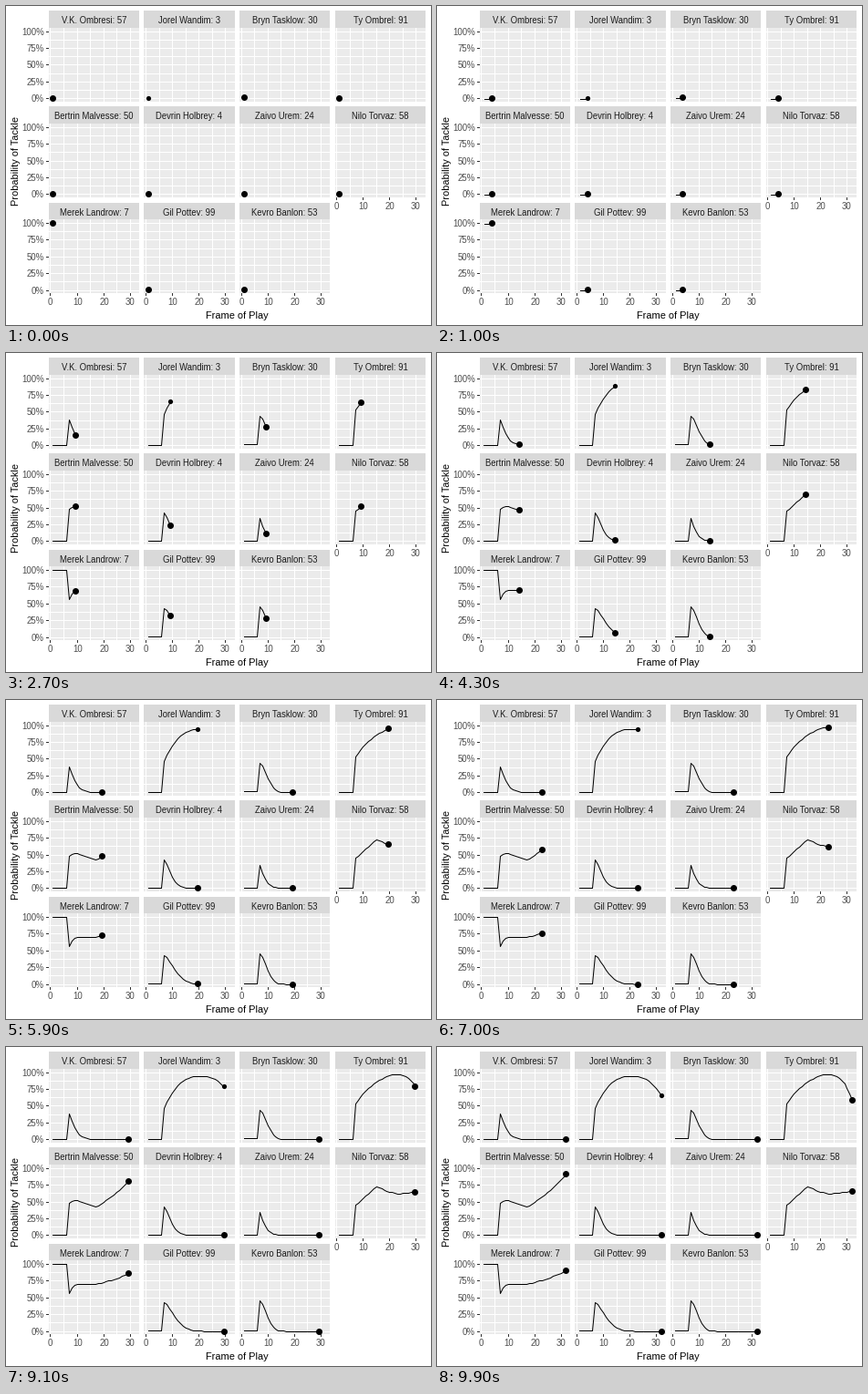
Recreate the animation shown at these times as a matplotlib script. Size 466 by 350 pixels, loop 10000 ms.

```python
import numpy as np
import matplotlib.pyplot as plt
from matplotlib.animation import FuncAnimation
from matplotlib.patches import Circle, Rectangle

W, H, DPI = 466, 350, 64
PT = 72 / DPI                      # points per pixel
FRAMES, INTERVAL = 100, 100

# Panel layout in pixels, y pointing down; scales are padded by 5 %
LEFT, PANEL_W, PITCH_X = 46.85, 99.12, 104.6
STRIP_TOP, PANEL_TOP, PANEL_H, PITCH_Y = 5.2, 23.92, 80.96, 105.2
UNIT_X, UNIT_Y = PANEL_W / 34.1, PANEL_H / 1.1

PLAY = np.arange(1, 33)
KEYS = np.round((PLAY - 1) / 31 * (FRAMES - 1))
JUMP = 7                           # play frame where every curve leaves its start


def decay(peak, tau, power, start=0.0):
    """Jump to a peak, then fade to zero."""
    age = np.maximum(PLAY - JUMP, 0) / tau
    return np.where(PLAY < JUMP, start, peak * np.exp(-age ** power))


def ease(u, power):
    """Ease in for a positive power, out for a negative one."""
    return u ** power if power > 0 else 1 - (1 - u) ** -power


def legs(first, *path, start=0.0):
    """Jump to first, then ease along (end frame, end value, power) legs."""
    values = np.where(PLAY < JUMP, start, first)
    t0, v0 = JUMP, first
    for t1, v1, power in path:
        u = np.clip((PLAY - t0) / (t1 - t0), 0, 1)
        values = values + (v1 - v0) * ease(u, power)
        t0, v0 = t1, v1
    return values


PLAYERS = [
    ("V.K. Ombresi: 57", decay(.385, 2.5, 1.15)),
    ("Jorel Wandim: 3", legs(.47, (20, .94, -2.5), (32, .65, 2.8))),
    ("Bryn Tasklow: 30", decay(.44, 3.6, 1.75, .012)),
    ("Ty Ombrel: 91", legs(.535, (22, .965, -1.8), (32, .585, 2.8))),
    ("Bertrin Malvesse: 50", legs(.48, (9.5, .525, -2), (17, .43, 1),
                                  (32, .91, 1.3))),
    ("Devrin Holbrey: 4", decay(.43, 3.2, 1.5)),
    ("Zaivo Urem: 24", decay(.347, 2.15, 1.15)),
    ("Nilo Torvaz: 58", legs(.455, (15, .73, 1.1), (24, .62, -1.6),
                             (32, .66, 1))),
    ("Merek Landrow: 7", legs(.56, (10, .7, -2.5), (15, .7, 1),
                              (32, .905, 1.6), start=1.0)),
    ("Gil Pottev: 99", decay(.43, 4.95, 1.6, .005)),
    ("Kevro Banlon: 53", decay(.458, 3.4, 1.75, .005)),
]
SMALL_DOT = 1

plt.rcParams["font.family"] = "Liberation Sans"
fig = plt.figure(figsize=(W / DPI, H / DPI), dpi=DPI, facecolor="white")
ax = fig.add_axes([0, 0, 1, 1])
ax.set_xlim(0, W)
ax.set_ylim(H, 0)
ax.axis("off")


def px(v):
    return np.floor(np.asarray(v) + 0.5)


def box(x0, y0, x1, y1, color):
    ax.add_patch(Rectangle((x0, y0), x1 - x0, y1 - y0, color=color, lw=0))


def label(x, y, text, size, color, ha="center", **kw):
    ax.text(x, y, text, fontsize=size * PT, color=color, ha=ha,
            va="baseline", **kw)


class Panel:
    def __init__(self, index, title, values):
        self.row, self.col = divmod(index, 4)
        self.values = values
        self.left = LEFT + self.col * PITCH_X
        self.top = PANEL_TOP + self.row * PITCH_Y
        self.draw_back(title)
        if self.col == 0:
            self.draw_y_axis()
        if index + 4 >= len(PLAYERS):
            self.draw_x_axis()
        self.line, = ax.plot([], [], color="black", lw=PT, zorder=3)
        radius = 2.6 if index == SMALL_DOT else 3.5
        self.dot = ax.add_patch(Circle((0, 0), radius, color="black", lw=0,
                                       zorder=4))

    def x(self, play):
        return px(self.left + (np.asarray(play) + 0.55) * UNIT_X)

    def y(self, prob):
        return px(self.top + (1.05 - np.asarray(prob)) * UNIT_Y)

    def draw_back(self, title):
        x0, x1 = px(self.left), px(self.left + PANEL_W)
        y0, y1 = px(self.top), px(self.top + PANEL_H)
        strip = px(STRIP_TOP + self.row * PITCH_Y)
        box(x0, strip, x1, y0, "#D9D9D9")
        box(x0, y0, x1, y1, "#EBEBEB")
        for p in np.arange(0, 1.01, 0.125):
            box(x0, self.y(p), x1, self.y(p) + 1, "white")
        for t in range(0, 31, 5):
            box(self.x(t), y0, self.x(t) + 1, y1, "white")
        label((x0 + x1) / 2, strip + 14, title, 9.5, "#1A1A1A")

    def draw_y_axis(self):
        x0 = px(self.left)
        for p in range(0, 101, 25):
            y = self.y(p / 100)
            box(x0 - 3, y, x0, y + 1, "#333333")
            label(42, y + 4, f"{p}%", 9.6, "#4D4D4D", "right")

    def draw_x_axis(self):
        y1 = px(self.top + PANEL_H)
        for t in range(0, 31, 10):
            x = self.x(t)
            box(x, y1, x + 1, y1 + 3, "#333333")
            label(x + 0.5, y1 + 13, str(t), 9.6, "#4D4D4D")

    def update(self, i):
        past = KEYS < i
        play = np.append(PLAY[past], np.interp(i, KEYS, PLAY))
        prob = np.append(self.values[past], np.interp(i, KEYS, self.values))
        xs, ys = self.x(play) + 0.5, self.y(prob) + 0.5
        self.line.set_data(xs, ys)
        self.dot.center = xs[-1], ys[-1]


panels = [Panel(k, *player) for k, player in enumerate(PLAYERS)]
label(253, 343, "Frame of Play", 11, "black")
label(14, 170, "Probability of Tackle", 11, "black", rotation=90,
      rotation_mode="anchor")


def update(i):
    for panel in panels:
        panel.update(i)
    return []


anim = FuncAnimation(fig, update, frames=FRAMES, interval=INTERVAL,
                     repeat=True, repeat_delay=0, blit=False)
plt.show()
```
